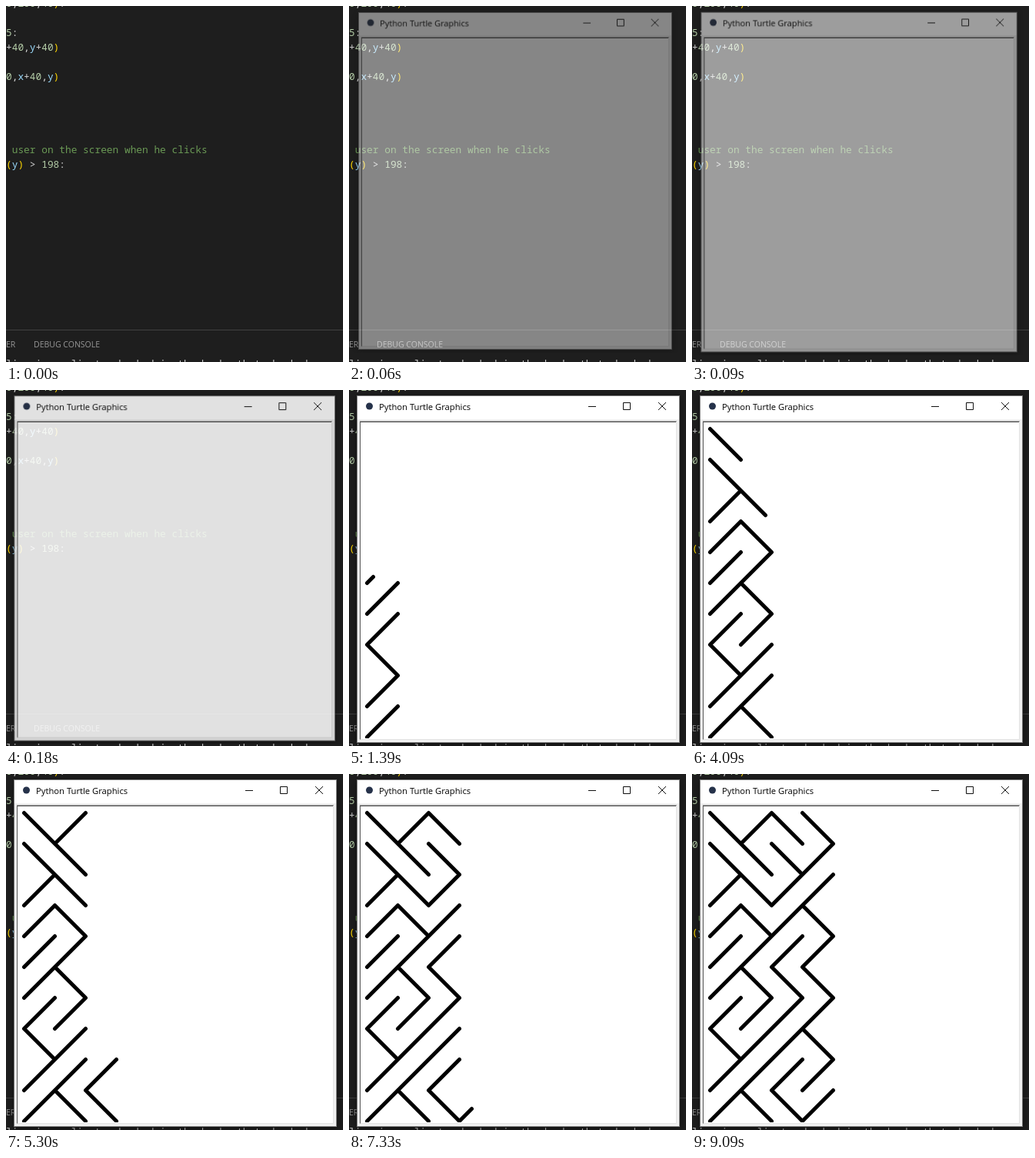
Write an HTML page with a canvas that moves like this. It is 438x462 px and loops after 9.18 s.

```html
<!DOCTYPE html>
<html>
<head>
<meta charset="utf-8">
<style>
  html, body { margin: 0; width: 100%; height: 100%; overflow: hidden; background: #1e1e1e; }
  canvas { position: absolute; left: 0; top: 0; }
  #win { transform-origin: 79px 41px; }
</style>
</head>
<body>
<canvas id="editor" width="438" height="462"></canvas>
<canvas id="win" width="438" height="462"></canvas>
<script>
const LOOP = 9180, CELL = 40, LEFT = 23.5, BOTTOM = 450.5;
const DRAW_HOPS = 5, DRAW_COST = 3, MOVE_COST = 2;

// Maze columns from bottom to top: 1 is "/", 0 is "\"
const columns = [
  { cells: '1101111100', start: 440, end: 2265 },
  { cells: '0111010001', start: 2660, end: 4520 },
  { cells: '0111011100', start: 4975, end: 6865 },
  { cells: '1101010110', start: 7280, end: 9085 },
];

const win = document.getElementById('win');
const ed = document.getElementById('editor').getContext('2d');
const g = win.getContext('2d');

function rect(c, color, x, y, w, h) {
  c.fillStyle = color;
  c.fillRect(x, y, w, h);
}

function text(c, font, color, str, x, y) {
  c.font = font;
  c.fillStyle = color;
  c.fillText(str, x, y);
}

function drawEditor() {
  const mono = '12.83px "Noto Sans Mono", monospace';
  const ui = '10.5px "Open Sans", sans-serif';
  const num = '#b5cea8', id = '#9cdcfe', paren = '#ffd700', plain = '#d4d4d4';
  const code = (y, ...parts) => {
    let x = 0;
    for (const [str, color] of parts) {
      text(ed, mono, color, str, x, y);
      x += str.length * 7.7;
    }
  };
  rect(ed, '#1e1e1e', 0, 0, 438, 462);
  code(1, ['0', num], [',', plain], ['200', num], [',', plain], ['40', num], [')', paren], [':', plain]);
  code(39, ['5', num], [':', plain]);
  code(58, ['+', plain], ['40', num], [',', plain], ['y', id], ['+', plain], ['40', num], [')', paren]);
  code(96, ['0', num], [',', plain], ['x', id], ['+', plain], ['40', num], [',', plain], ['y', id], [')', paren]);
  code(191, [' user on the screen when he clicks', '#6a9955']);
  code(210, ['(', paren], ['y', id], [')', paren], [' > ', plain], ['198', num], [':', plain]);
  rect(ed, '#414141', 0, 420, 438, 1);
  text(ed, ui, '#969696', 'ER', 0, 443);
  text(ed, ui, '#969696', 'DEBUG CONSOLE', 36, 443);
  code(469, ['line is a client, checked in the back, that checked', '#cccccc']);
}

function drawFrame() {
  g.clearRect(0, 0, 438, 462);
  g.shadowColor = 'rgba(0,0,0,.5)';
  g.shadowBlur = 9;
  g.shadowOffsetY = 2;
  rect(g, '#fff', 10, 7, 420, 451);
  g.shadowColor = 'transparent';
  rect(g, '#f0f0f0', 11, 38, 418, 419);
  g.strokeStyle = '#777';
  g.lineWidth = 1;
  g.strokeRect(10.5, 7.5, 419, 450);

  rect(g, '#a0a0a0', 14, 40, 412, 414);
  rect(g, '#e3e3e3', 15, 41, 411, 413);
  rect(g, '#555', 14, 41, 411, 1);
  rect(g, '#555', 14, 41, 1, 412);
  rect(g, '#fff', 15, 42, 410, 411);

  g.fillStyle = '#26324a';
  g.beginPath();
  g.arc(26.5, 21, 4.5, 0, 7);
  g.fill();
  text(g, '11.24px "Open Sans", sans-serif', '#000', 'Python Turtle Graphics', 39, 26);

  g.strokeStyle = '#111';
  g.beginPath();
  g.moveTo(311, 21.5); g.lineTo(321, 21.5);
  g.rect(356.5, 16.5, 9, 9);
  g.moveTo(402, 16); g.lineTo(412, 26);
  g.moveTo(412, 16); g.lineTo(402, 26);
  g.stroke();
}

// Pen-up hops between two neighbouring cells
const moveHops = (a, b) => a + b === 2 ? 4 : a + b === 1 ? 5 : 8;

function drawColumn({ cells, start, end }, col, t) {
  if (t < start) return;
  const dirs = [...cells].map(Number);
  let total = 0;
  const begins = dirs.map((dir, i) => {
    if (i) total += MOVE_COST * moveHops(dirs[i - 1], dir);
    const begin = total;
    total += DRAW_COST * DRAW_HOPS;
    return begin;
  });
  const done = (t - start) / (end - start) * total;
  const x = LEFT + col * CELL;
  dirs.forEach((dir, i) => {
    const hops = Math.min(DRAW_HOPS, Math.floor((done - begins[i]) / DRAW_COST + 1e-6));
    if (hops <= 0) return;
    const d = CELL * hops / DRAW_HOPS;
    const y = BOTTOM - (dir ? i : i + 1) * CELL;
    g.moveTo(x, y);
    g.lineTo(x + d, dir ? y - d : y + d);
  });
}

function drawMaze(t) {
  g.save();
  g.beginPath();
  g.rect(15, 42, 410, 410);
  g.clip();
  g.beginPath();
  columns.forEach((column, i) => drawColumn(column, i, t));
  g.strokeStyle = '#000';
  g.lineWidth = 5;
  g.lineCap = 'round';
  g.stroke();
  g.restore();
}

// Linear interpolation through [time, value] points
function ramp(t, points) {
  for (let i = 1; i < points.length; i++) {
    const [t0, v0] = points[i - 1], [t1, v1] = points[i];
    if (t < t1) return v0 + (v1 - v0) * Math.max(0, t - t0) / (t1 - t0);
  }
  return points[points.length - 1][1];
}

function tick() {
  const t = performance.now() % LOOP;
  win.style.opacity = t < 30 ? 0 : ramp(t, [[30, .22], [60, .46], [180, .87], [240, 1]]);
  win.style.transform = `scale(${ramp(t, [[30, .96], [60, .971], [120, .987], [180, .994], [270, 1]])})`;
  drawFrame();
  drawMaze(t);
  requestAnimationFrame(tick);
}

drawEditor();
tick();
</script>
</body>
</html>
```
